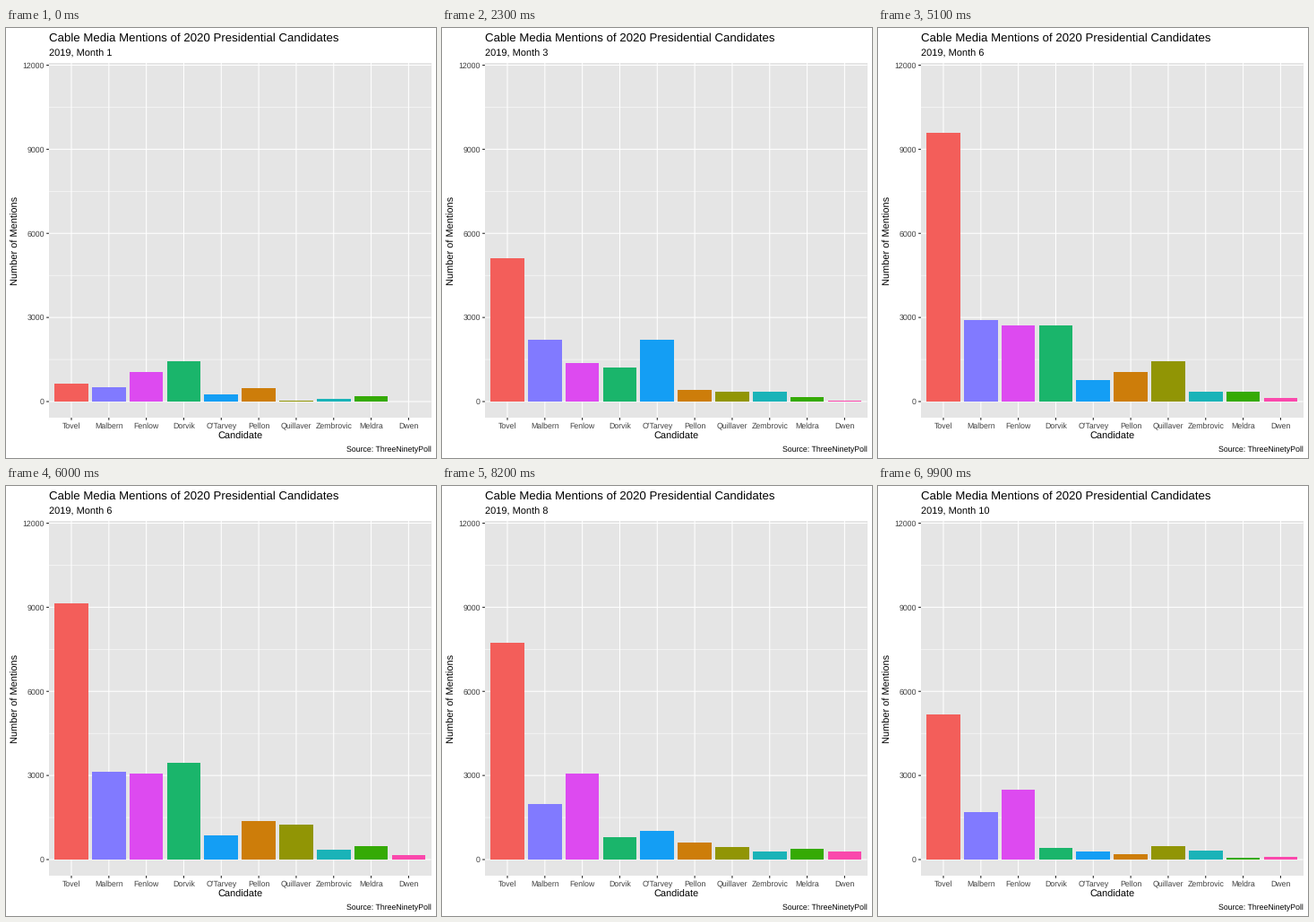
Animation, 480 px wide and 480 px high, one loop 10 s. Source, as a matplotlib script:

```python
import matplotlib.pyplot as plt
import numpy as np
from matplotlib.animation import FuncAnimation
from matplotlib.patches import Rectangle

plt.rcParams["font.family"] = "Liberation Sans"
plt.rcParams["text.hinting"] = "none"

SIZE, DPI = 480, 72
MONTHS, STEPS = 10, 11  # months shown, frames per month
FRAMES = (MONTHS - 1) * STEPS + 1
LEFT, RIGHT, TOP, BOTTOM = 47.9, 474.5, 39, 435
ZERO, SCALE = 417, 375.5 / 12000
UNIT = (RIGHT - LEFT) / (MONTHS + 0.2)  # width of one category
BAR = 0.9 * UNIT
TICK, TICK_TEXT = "#262626", "#404040"

# name, colour, trend start, trend end, news surges as (month, size)
CANDIDATES = [
    ("Tovel", "#f35e5a", 640, 1813, (3.65, 6200), (6.05, 10550), (9, 9150)),
    ("Malbern", "#817aff", 510, 1640, (3.8, 2500), (6.3, 2450), (8.5, 600)),
    ("Fenlow", "#dd4af0", 1055, 2377, (6.3, 1500), (8.5, 1100)),
    ("Dorvik", "#1ab56b", 1438, 415, (6.5, 3400)),
    ("O'Tarvey", "#149ef4", 220, 180, (3, 2100), (6.2, 800), (8.5, 1050)),
    ("Pellon", "#cd7d0a", 480, 150, (6.5, 1380), (8.5, 420)),
    ("Quillaver", "#919505", 32, 480, (4.5, 1250), (6.3, 1130)),
    ("Zembrovic", "#1ab3b8", 65, 320, (2.5, 300), (5.7, 200)),
    ("Meldra", "#35aa05", 190, 24, (6.5, 470), (8.5, 390)),
    ("Dwen", "#fa48ac", 6, 63, (6, 130), (8.5, 310)),
]


def monthly(start, end, *surges):
    """Straight trend plus a bell-shaped surge around each news event."""
    months = np.arange(1, MONTHS + 1)
    trend = np.linspace(start, end, MONTHS)
    return trend + sum(size * np.exp(-(months - at) ** 2) for at, size in surges)


def y_of(value):
    return ZERO - value * SCALE


fig = plt.figure(figsize=(SIZE / DPI, SIZE / DPI), dpi=DPI, facecolor="white")
ax = fig.add_axes([0, 0, 1, 1])
ax.set_xlim(0, SIZE)
ax.set_ylim(SIZE, 0)
ax.axis("off")


def line(x0, y0, x1, y1, color="white", width=1.07):
    ax.plot([x0, x1], [y0, y1], color=color, lw=width, snap=False,
            solid_capstyle="butt", zorder=2)


def box(x, y, width, height, color, zorder):
    return ax.add_patch(Rectangle((x, y), width, height, fc=color, lw=0,
                                  snap=True, zorder=zorder))


def label(x, y, text, size, color="black", **kw):
    return ax.text(x, y, text, size=size, color=color, zorder=4, **kw)


box(LEFT, TOP, RIGHT - LEFT, BOTTOM - TOP, "#e5e5e5", 1)

for value in range(1500, 12000, 3000):
    line(LEFT, y_of(value), RIGHT, y_of(value), width=0.53)
for value in range(0, 12001, 3000):
    y = y_of(value)
    line(LEFT, y, RIGHT, y)
    line(LEFT - 2.75, y, LEFT, y, TICK)
    label(43, y + 3.2, str(value), 8.8, TICK_TEXT, ha="right")

bars, mentions = [], []
for i, (name, color, *shape) in enumerate(CANDIDATES):
    x = LEFT + (i + 0.6) * UNIT
    line(x, TOP, x, BOTTOM)
    line(x, BOTTOM, x, BOTTOM + 2.75, TICK)
    label(x, 447, name, 8.8, TICK_TEXT, ha="center")
    bars.append(box(x - BAR / 2, ZERO, BAR, 0, color, 3))
    mentions.append(monthly(*shape))

label(LEFT, 15, "Cable Media Mentions of 2020 Presidential Candidates", 13.2)
subtitle = label(LEFT, 31.5, "", 11)
label((LEFT + RIGHT) / 2, 459, "Candidate", 11, ha="center")
label(13.5, (TOP + BOTTOM) / 2, "Number of Mentions", 11, rotation=90,
      rotation_mode="anchor", ha="center", va="baseline")
label(RIGHT, 473, "Source: ThreeNinetyPoll", 8.8, ha="right")


def update(frame):
    month = frame / STEPS
    for bar, counts in zip(bars, mentions):
        bar.set_height(-SCALE * np.interp(month, range(MONTHS), counts))
    subtitle.set_text(f"2019, Month {round(month) + 1}")
    return [*bars, subtitle]


anim = FuncAnimation(fig, update, frames=FRAMES, interval=100,
                     repeat=True, repeat_delay=0)
plt.show()
```
